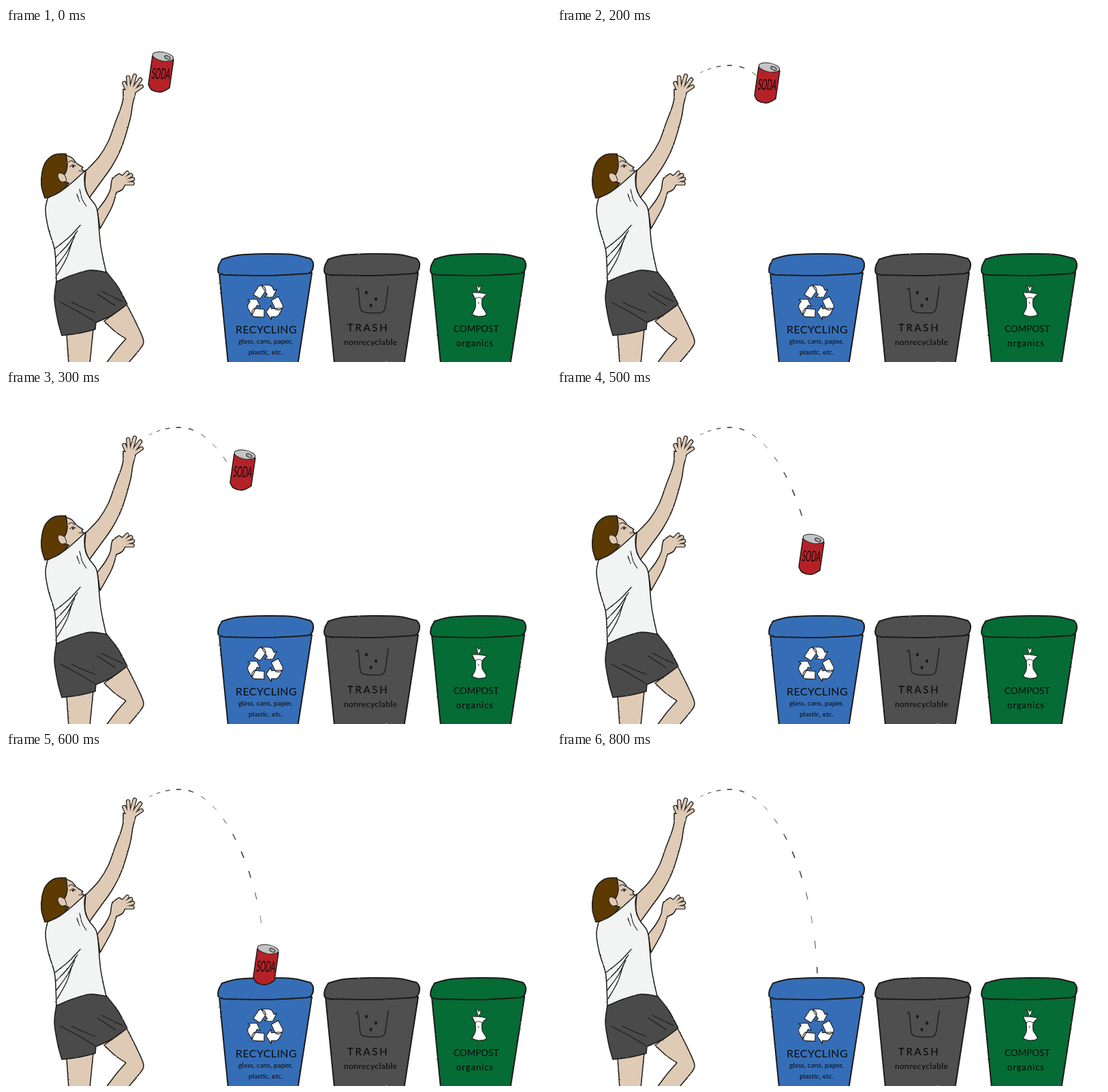
Recreate the animation shown at these times as an HTML page. Size 800 px wide and 491 px high, loop 1400 ms.

```html
<!DOCTYPE html>
<html lang="en">
<head>
<meta charset="utf-8">
<title>Sorting waste</title>
<style>
  html, body { margin: 0; width: 100%; height: 100%; overflow: hidden; background: #fff; }
  svg { display: block; width: 100vw; height: 100vh; }
  path, ellipse { stroke: #1c1b1a; stroke-width: 1.5; stroke-linecap: round; stroke-linejoin: round; }
  text { font-family: Lato, "Open Sans", sans-serif; fill: #0c0c0c; }
</style>
</head>
<body>
<svg viewBox="0 0 800 491" preserveAspectRatio="none">
  <defs>
    <filter id="pencil" filterUnits="userSpaceOnUse" x="0" y="0" width="800" height="491" color-interpolation-filters="sRGB">
      <feTurbulence type="fractalNoise" baseFrequency=".35" numOctaves="2" seed="4" result="n"/>
      <feDisplacementMap in="SourceGraphic" in2="n" scale="1.8" xChannelSelector="R" yChannelSelector="G"/>
    </filter>
    <clipPath id="mouth"><path d="M0 0H800V363H440Q381 366 322 363H0Z"/></clipPath>
  </defs>
  <g id="scene" filter="url(#pencil)"></g>
  <g id="trail" opacity=".85"></g>
  <g clip-path="url(#mouth)"><g id="can"></g></g>
</svg>

<script>
const SKIN = "#dfcab5", LOOP = 1400, STEP = 100;
const [scene, trail, can] = ["scene", "trail", "can"].map(id => document.getElementById(id));

function add(parent, tag, attrs) {
  const el = document.createElementNS("http://www.w3.org/2000/svg", tag);
  for (const k in attrs) el.setAttribute(k, attrs[k]);
  return parent.appendChild(el);
}

// Smooth path through "x,y" points; "/" marks a corner.
function curve(spec) {
  let last, d = "";
  for (const run of spec.split("/")) {
    const pts = run.trim().split(/\s+/).map(p => p.split(",").map(Number));
    if (last) pts.unshift(last);
    else d = "M" + pts[0];
    for (let i = 0; i + 1 < pts.length; i++) {
      const [a, b] = [pts[i], pts[i + 1]];
      const before = pts[i - 1] || a, after = pts[i + 2] || b;
      const c1 = a.map((v, k) => v + (b[k] - before[k]) / 6);
      const c2 = b.map((v, k) => v - (after[k] - a[k]) / 6);
      d += `C${c1} ${c2} ${b}`;
    }
    last = pts[pts.length - 1];
  }
  return d;
}

const shape = (g, spec, fill, width = 1.5) =>
  add(g, "path", { d: curve(spec) + "Z", fill, style: `stroke-width:${width}` });
const line = (g, spec, width = 1.1) =>
  add(g, "path", { d: curve(spec), fill: "none", style: `stroke-width:${width}` });
const oval = (g, cx, cy, rx, ry, fill, turn = 0) =>
  add(g, "ellipse", { cx, cy, rx, ry, fill, style: "stroke-width:1", transform: `rotate(${turn} ${cx} ${cy})` });

function label(g, x, y, size, str, spacing = 0, weight = 400) {
  add(g, "text", { x, y, "font-size": size, "letter-spacing": spacing, "font-weight": weight }).textContent = str;
}

// An arm ending in a fan of fingers around the palm.
function arm(spec, x, y, from, gap, count, base, bulge) {
  const fan = (color, width) => {
    for (let i = 0; i < count; i++) {
      const a = (from + gap * i) * Math.PI / 180;
      const len = base + bulge * Math.sin(Math.PI * (i + .3) / count);
      add(scene, "path", {
        d: `M${x} ${y}l${len * Math.cos(a)} ${len * Math.sin(a)}`,
        style: `stroke:${color};stroke-width:${width}`
      });
    }
  };
  fan("#1c1b1a", 6.4);
  shape(scene, spec, SKIN);
  fan(SKIN, 4);
  add(scene, "circle", { cx: x, cy: y, r: 8, fill: SKIN });
}

function person() {
  shape(scene, "89,450 92,494 / 123,494 / 128,443", SKIN);
  shape(scene, "144,431 160,446 176,457 / 162,473 147,493 / 179,493 / 195,474 202,461 194,440 177,406", SKIN);
  arm("134,268 146,252 153,238 156,222 166,214 / 176,222 172,236 162,242 / 155,264 138,295", 164, 228, -47, 16, 4, 20, 3);
  arm("117,210 136,190 150,167 160,140 169,116 172,104 / 172,90 / 191,92 / 186,112 182,135 169,177 155,204 138,228 122,250 / 116,232 117,210",
    181, 98, -114, 20, 5, 16, 13);

  shape(scene, "88,187 97,191 104,199 113,205 / 111,207 / 114,210 / 112,216 104,221 96,229 / 86,236 / 76,216 80,200 88,187", SKIN);
  shape(scene, "88,185 72,186 59,196 53,212 52,232 57,250 / 70,247 82,240 92,228 / 85,226 / 80,216 / 86,215 90,202 88,185", "#5d3a02");
  shape(scene, "86,216 79,213 76,218 81,226 89,225", SKIN, 1);
  line(scene, "92,197 96,195 101,198");
  line(scene, "94,204 98,201 102,203");
  line(scene, "107,210 112,210");
  oval(scene, 98.5, 203.5, 1, 1.5, "#1c1b1a");

  shape(scene, "74,372 71,398 76,430 82,452 / 106,449 131,443 / 132,433 / 156,422 178,406 / 164,380 147,358 / 110,355", "#4a4a4a");
  for (let i = 0; i < 2; i++) {
    line(scene, `${80 + 16 * i},403 ${106 + 7 * i},${417 - 6 * i} 131,${432 - 14 * i}`);
    line(scene, `${134 + 6 * i},${391 - 4 * i} ${160 + 11 * i},${408 - 6 * i}`);
  }
  shape(scene, "61,250 79,241 96,228 117,209 / 115,222 117,238 123,250 / 132,262 135,276 139,320 147,359 / 124,356 98,363 74,373 / 73,346 71,324 62,294 58,268 61,250", "#f2f4f4");
  for (let i = 0; i < 4; i++) {
    line(scene, `${109 - 4 * i},${290 + 8 * i} ${92 - i},${308 + 10 * i} ${72 + i},${324 + 13 * i}`, 1.3);
  }
  line(scene, "108,237 112,252 118,262");
  line(scene, "104,244 108,255");
}

function bin(x, fill) {
  const g = add(scene, "g", { transform: `translate(${x})` });
  shape(g, "313,360 / 326,493 / 428.5,493 / 449,360", fill, 2);
  shape(g, "317,340 340,334 381,332 420,333 447,339 / 451,346 449,357 443,361 / 381,364 320,363 / 312,360 312,350 317,340", fill, 2);
  return g;
}

function bins() {
  const blue = bin(0, "#356eb7");
  for (let i = 0; i < 3; i++) {
    const g = add(blue, "g", { transform: `translate(380.5 404) rotate(${120 * i})` });
    add(g, "path", {
      d: "M-17.5 -12L-10 -24L-6 -26L-1 -23L1 -18L-7.5 -6ZM-6 -26H6L10 -24L13 -18L17 -20L11 -8L-1 -9L3 -12Z",
      fill: "#fff", style: "stroke-width:1.1"
    });
  }
  label(blue, 337, 449, 16, "RECYCLING", .4);
  label(blue, 341, 464, 10.3, "glass, cans, paper,");
  label(blue, 356, 480, 10.3, "plastic, etc.");

  const grey = bin(156, "#4f4f4f");
  line(grey, "358,384 361,383 363,402 366,416 382,419 398,417 402,402 405,380", 1.3);
  for (const [x, y] of [[373, 389], [387, 398.5], [379.5, 408]]) oval(grey, x, y, 1.5, 2.3, "#1c1b1a");
  label(grey, 345, 446, 15, "TRASH", 2.6, 500);
  label(grey, 340, 466, 12, "nonrecyclable", .4, 500);

  const green = bin(312, "#056c35");
  shape(green, "381,388 379,380 / 376,379 / 380,379 382,381 / 386,379 / 382,388", "#fff", 1);
  shape(green, "372,389 382,389 394,391 / 387,399 387,410 / 393,421 382,424 372,421 / 377,411 377,399", "#fff", 1.1);
  line(green, "376,398 382,396 387,398", .9);
  line(green, "381,403 382,405", 1);
  label(green, 345, 447, 13.5, "COMPOST");
  label(green, 349, 468, 13, "organics", .9, 500);
}

function soda() {
  shape(can, "215,41 209,83 / 214,91 228,94 240,88 / 246,47", "#b42228");
  oval(can, 230.5, 42, 15.5, 6.5, "#c3c4c5", 11);
  oval(can, 237, 43.5, 4.5, 2.3, "#a9aaab", 25);
  const g = add(can, "g", { transform: "translate(213 74.5) rotate(2) skewX(-6) scale(.45 1)" });
  label(g, 0, 0, 22, "SODA");
}

// Dashes spread out and swell in waves along the flight path.
function flight() {
  const path = document.createElementNS("http://www.w3.org/2000/svg", "path");
  path.setAttribute("d", "M208 67C225 58 240 55 256 55C312 55 376 165 382 325");
  return Array.from({ length: 15 }, (_, i) => {
    const s = 5 + 11 * i + 1.05 * i * i, half = 2.2 + .25 * i;
    const [a, mid, b] = [s - half, s, s + half].map(v => path.getPointAtLength(v));
    const width = 1.2 + .5 * Math.cos((i - 3) * Math.PI / 3);
    const el = add(trail, "path", { d: `M${a.x} ${a.y}L${b.x} ${b.y}`, style: `stroke-width:${width}` });
    return { el, x: mid.x, y: mid.y };
  });
}

person();
bins();
soda();
const dashes = flight();

// Can offsets, one per step; afterwards it is inside the bin.
const poses = [[0, 0], [39, -3], [81, 16], [120, 53], [134, 109.5], [146, 177], [154, 248], [156, 285]];

function draw(t) {
  const pose = poses[Math.floor(t % LOOP / STEP)];
  can.style.display = pose ? "" : "none";
  if (pose) can.setAttribute("transform", `translate(${pose})`);
  for (const { el, x, y } of dashes) {
    const passed = !pose || x < 210 + pose[0] || y < 34 + pose[1];
    el.style.display = passed ? "" : "none";
  }
}

const t0 = performance.now();
function tick() {
  draw(performance.now() - t0);
  requestAnimationFrame(tick);
}
tick();
</script>
</body>
</html>
```
